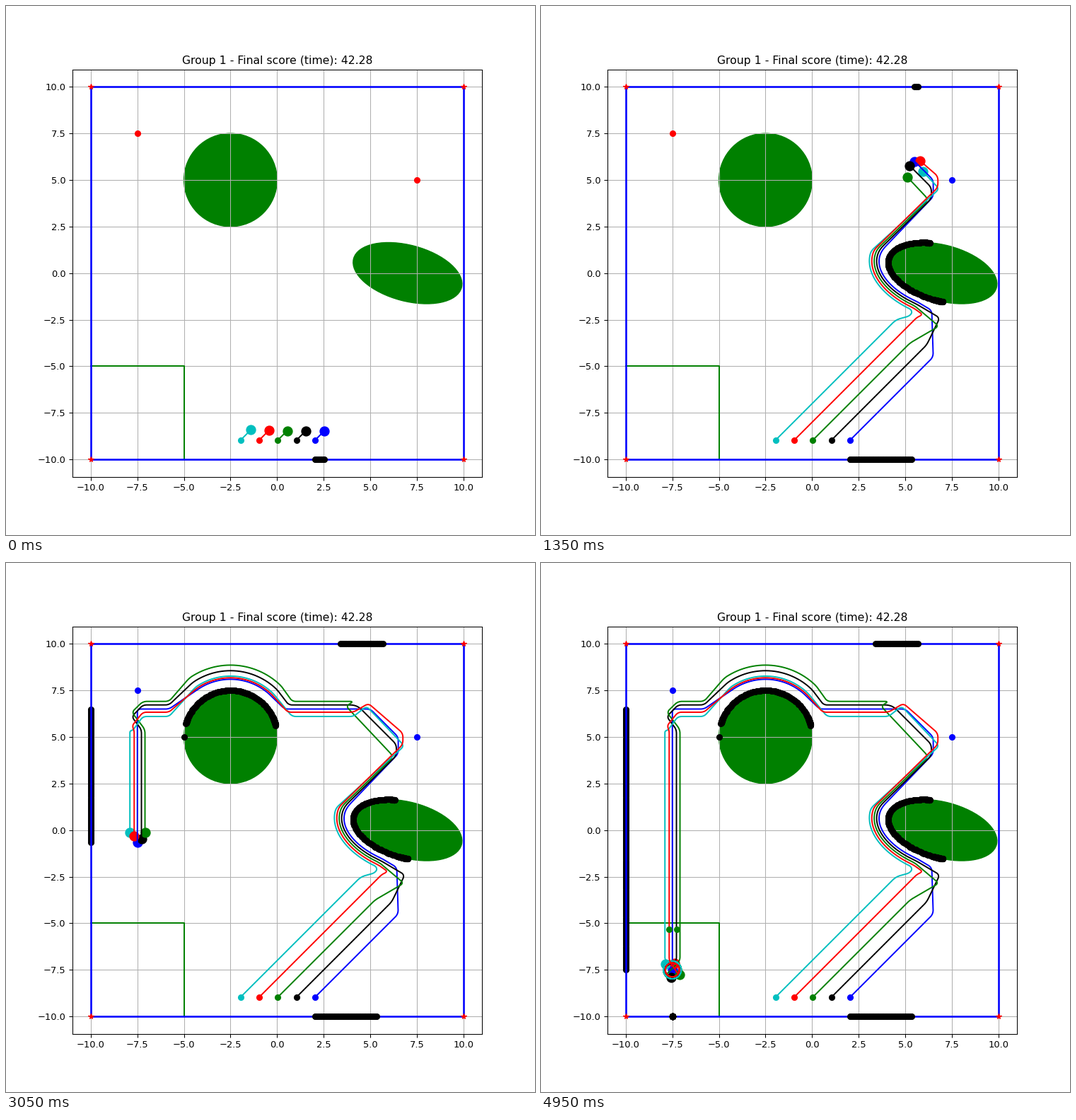
A matplotlib script that plays this animation: 748x748 px, repeating every 5 s.

```python
import numpy as np
import matplotlib.pyplot as plt
from matplotlib.animation import FuncAnimation
from matplotlib.patches import Circle, Ellipse

FRAMES, SUB = 100, 8
T = np.linspace(-1, FRAMES - 1, FRAMES * SUB + 1)
BALL, BALL_R = (-2.5, 5), 2.5
OVAL, OVAL_A, OVAL_B, OVAL_TILT = (7, 0), 3, 1.5, -15
GOAL_X, GOAL_Y = -7.5, -7.5
PACE = 11, 27, 38, 61     # frames at which the shared stages end
SPIN = 33.2               # degrees per frame around the goal


def curve(center, a, b, tilt, t0, t1, n=24):
    """Points of a tilted ellipse between two parameter angles."""
    t = np.radians(np.linspace(t0, t1, n))
    c, s = np.cos(np.radians(tilt)), np.sin(np.radians(tilt))
    x, y = a * np.cos(t), b * np.sin(t)
    return list(zip(center[0] + x * c - y * s, center[1] + x * s + y * c))


def travel(start, stages, times):
    """Constant speed along every stage, from one time to the next."""
    out = np.empty((len(T), 2))
    for stage, t0, t1 in zip(stages, times, times[1:]):
        pts = np.array([start] + stage)
        s = np.r_[0, np.cumsum(np.hypot(*np.diff(pts, axis=0).T))]
        on = T >= t0
        d = np.clip((T[on] - t0) / (t1 - t0), 0, 1) * s[-1]
        out[on] = np.column_stack([np.interp(d, s, pts[:, k]) for k in (0, 1)])
        start = stage[-1]
    return out


def smooth(path, width=5):
    padded = np.pad(path, ((width // 2, width // 2), (0, 0)), mode='edge')
    box = np.ones(width) / width
    return np.column_stack([np.convolve(col, box, 'valid') for col in padded.T])


def drive(rank, lane, lag, run, swing, corner, rise, peak, ball_gap, phase):
    """Route of one robot: past the oval, along the top, over the ball, home."""
    start = 2 - rank, -9
    gap = .4 + .13 * rank
    around = curve(OVAL, OVAL_A + .1 + gap, OVAL_B + gap, OVAL_TILT,
                   255, 164 + 3 * rank)
    top = corner[0], corner[1] + rise
    share = .67 - .08 * lag
    halfway = tuple(p + share * (q - p) for p, q in zip(top, peak))

    r, split = BALL_R + ball_gap, 63 - 6 * lag
    row, column = 6.5 + lane, GOAL_X + lane
    bulge = .3 if rank else 0
    home = [(GOAL_X - bulge, 5.8 + 1.3 * lane), (column, 5.4),
            (column, -.65 + .17 * lag)]
    stages = [
        [(start[0] + run, start[1] + run), swing],
        around + [corner, top, halfway],
        [peak, (4.1, row), (.4 + abs(lane), row)]
        + curve(BALL, r, r, 0, 45, split),
        curve(BALL, r, r, 0, split, 125)
        + [(-5.8, row), (GOAL_X + bulge, row)] + home,
    ]
    if rank == 0:
        return smooth(travel(start, stages + [[(GOAL_X, GOAL_Y)]],
                             (-1, *PACE, 72)))

    end = 74
    angle = np.radians(phase + SPIN * (T - 84))
    radius = .3 + .45 * abs(lane)
    ring = np.column_stack([GOAL_X + radius * np.cos(angle),
                            GOAL_Y + radius * np.sin(angle)])
    circling = T >= end
    stages.append([(column, -7), tuple(ring[circling][0])])
    path = travel(start, stages, (-1, *PACE, end))
    path[circling] = ring[circling]
    return smooth(path)


blue = drive(0, 0, 0, 4.5, (6.42, -2), (6.5, 4.1), .9, (5, 6.5), .6, 0)
black = drive(1, .22, 1, 5.15, (6.85, -2.4), (6.4, 4), .6, (4.4, 6.6), 1.06, 124)
green = drive(2, .41, 3, 5.25, (6.8, -2.85), (6.2, 3.9), .1, (3.7, 6.65), 1.36, 191)
red = drive(3, -.17, 2, 6.7, (5.97, -2.25), (6.75, 4.6), .6, (4.9, 6.8), .68, -64)
cyan = drive(4, -.4, 3, 6.5, (5.3, -2.28), (6.8, 4.5), .05, (4.8, 6.65), .77, 6)
robots = dict(b=blue, k=black, g=green, c=cyan, r=red)

outline = np.array(curve(OVAL, OVAL_A, OVAL_B, OVAL_TILT, 0, 360, 721))


def nearest(p):
    """Closest point of the walls and obstacles."""
    x, y = p
    away = p - np.array(BALL)
    ball = BALL + BALL_R * away / np.hypot(*away)
    oval = outline[np.argmin(np.hypot(*(outline - p).T))]
    hits = np.array([(x, -10), ball, oval, (-10, y), (x, 10), (10, y)])
    dist = np.hypot(*(hits - p).T)
    dist[:2] -= 1e-6, 3e-4    # ties favour the floor, then the ball
    return hits[np.argmin(dist)]


contacts = np.array([nearest(p) for p in blue])

fig, ax = plt.subplots(figsize=(8, 8), dpi=93.5)
ax.set_xlim(-11, 11)
ax.set_ylim(-10.93, 10.93)
ticks = np.arange(-10, 10.1, 2.5)
ax.set_xticks(ticks)
ax.set_yticks(ticks)
ax.grid(True)
ax.set_title('Group 1 - Final score (time): 42.28')

ax.add_patch(Circle(BALL, BALL_R, color='g'))
ax.add_patch(Ellipse(OVAL, 2 * OVAL_A, 2 * OVAL_B, angle=OVAL_TILT, color='g'))
ax.plot([-10, -5, -5], [-5, -5, -10], 'g')
wall_x, wall_y = [-10, 10, 10, -10], [-10, -10, 10, 10]
ax.plot(wall_x, wall_y, 'b', lw=2)
ax.plot([-10, -10], [-10, 10], 'b', lw=2, zorder=2.6)
ax.plot(wall_x, wall_y, 'r*', zorder=2.7)

contact_dots, = ax.plot([], [], 'ko', zorder=2.5)
heads, trails = [], []
for color, path in robots.items():
    ax.plot(*path[0], color + 'o', zorder=3)
    heads += ax.plot([], [], color + 'o', ms=10, zorder=3)
    trails += ax.plot([], [], color, zorder=4)

# Checkpoints turn blue once the leader has come close
checkpoints = []
for point in [(7.5, 5), (-7.5, 7.5)]:
    dot, = ax.plot(*point, 'ro', zorder=3)
    checkpoints.append((dot, np.argmax(np.hypot(*(blue - point).T) < 1.1)))

# Marks where two followers enter the goal box
entries = []
for path in (red, black):
    entered = np.argmax((T > PACE[-1]) & (path[:, 1] < -5.25))
    dot, = ax.plot(*path[entered], 'go', zorder=5)
    entries.append((dot, entered))


def update(frame):
    i = (frame + 1) * SUB
    for path, head, trail in zip(robots.values(), heads, trails):
        head.set_data(*path[i:i + 1].T)
        trail.set_data(*path[:i + 1].T)
    contact_dots.set_data(*contacts[:i + 1].T)
    for dot, reached in checkpoints:
        dot.set_color('b' if i >= reached else 'r')
    for dot, entered in entries:
        dot.set_visible(i >= entered)
    return heads + trails


anim = FuncAnimation(fig, update, frames=FRAMES, interval=50,
                     init_func=lambda: update(0), repeat=True)
plt.show()
```
